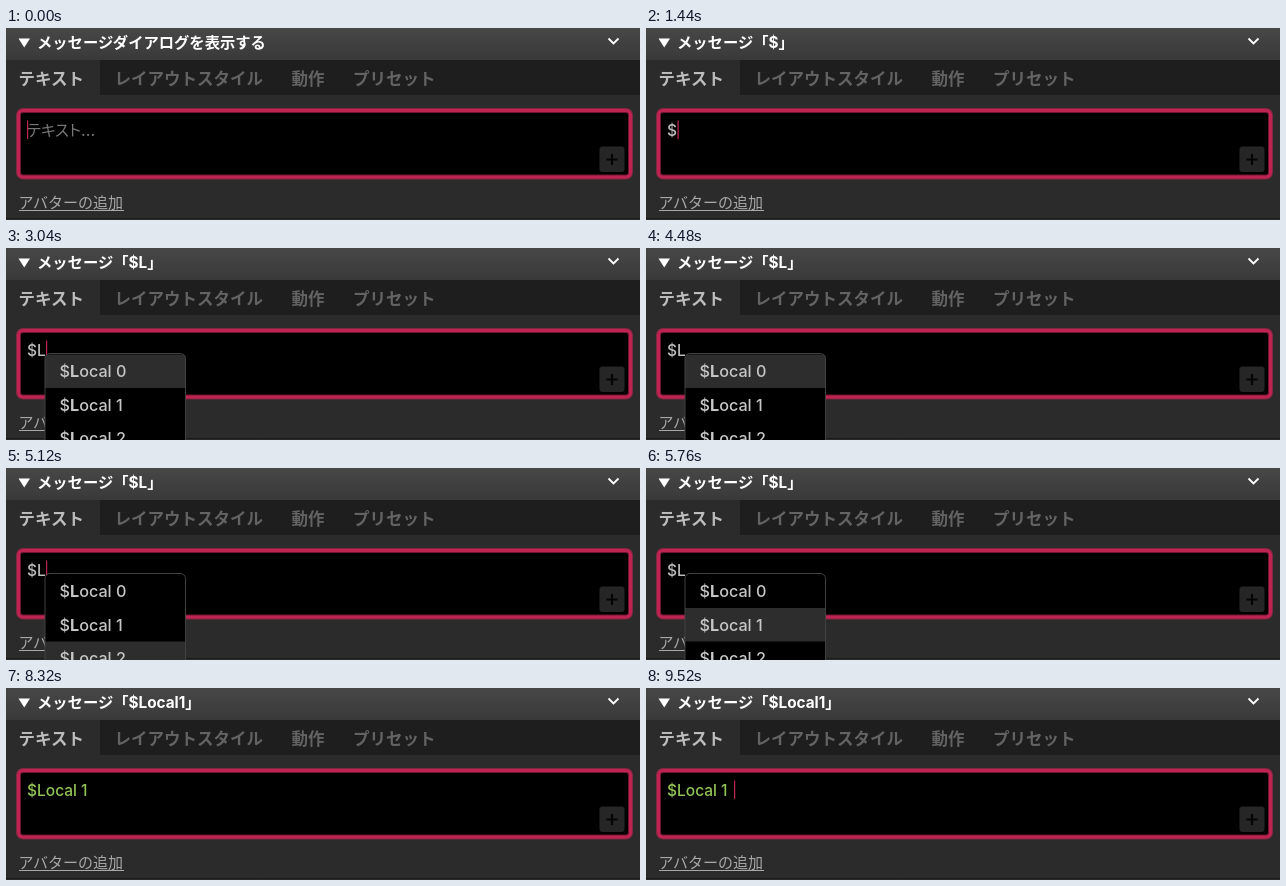
An HTML page for the animation above (9.6 s loop, 634 by 192 pixels).

```html
<!DOCTYPE html>
<html lang="ja">
<head>
<meta charset="utf-8">
<style>
html, body { margin: 0; width: 100%; height: 100%; overflow: hidden; background: #2b2b2b; }
svg { display: block; width: 634px; height: 192px; }
text { font-family: Inter, "Noto Sans CJK JP", "Noto Sans CJK", sans-serif; font-weight: 500; white-space: pre; }
.title { font-size: 15.3px; font-weight: 700; fill: #fff; }
.tab { font-size: 16.5px; font-weight: 700; fill: #636363; }
.tab.active { fill: #bdbdbd; }
.input { font-size: 15.5px; }
.hint { font-size: 15.5px; fill: #777; font-feature-settings: "palt"; }
.link { font-size: 15px; fill: #a8a8a8; }
.item { font-size: 16.2px; fill: #c6c6c6; }
.match { font-weight: 700; }
</style>
</head>
<body>
<svg viewBox="0 0 634 192">
  <defs>
    <linearGradient id="bar" x2="0" y2="1">
      <stop stop-color="#474747"/><stop offset="1" stop-color="#393939"/>
    </linearGradient>
    <clipPath id="menuClip"><rect x="39" y="105.5" width="140.5" height="110" rx="5"/></clipPath>
  </defs>

  <rect width="634" height="192" fill="#2b2b2b"/>
  <rect width="634" height="32" fill="url(#bar)"/>
  <path d="M12.5 10.5h11.5l-5.75 9z" fill="#fff"/>
  <text id="title" class="title" x="31" y="20"></text>
  <path d="M602.5 10.5l5 5 5-5" fill="none" stroke="#fff" stroke-width="1.8"/>

  <rect x="94" y="32" width="540" height="35" fill="#1e1e1e"/>
  <text class="tab active" x="12.5" y="57">テキスト</text>
  <text class="tab" x="108.5" y="57">レイアウトスタイル</text>
  <text class="tab" x="285.5" y="57">動作</text>
  <text class="tab" x="347" y="57">プリセット</text>

  <g stroke="#bd2452">
    <rect x="12.5" y="82.5" width="612" height="66.5" rx="4.5" fill="#000" stroke-width="5" stroke-opacity=".6"/>
    <rect x="12.5" y="82.5" width="612" height="66.5" rx="4.5" fill="none" stroke-width="3"/>
  </g>
  <text id="hint" class="hint" x="21" y="108">テキスト...</text>
  <text id="input" class="input" x="21" y="107.5"></text>
  <rect x="593.5" y="118.5" width="25" height="25.5" rx="3" fill="#262626"/>
  <path d="M600.5 131.5h11M606 126v11" stroke="#050505" stroke-width="2.2"/>

  <text class="link" x="12.5" y="179.5">アバターの追加</text>
  <path d="M13 182.5h105" stroke="#a8a8a8"/>
  <path d="M0 190.5h634" stroke="#1c1c1c"/>
  <rect id="caret" y="92.5" width="1.2" height="18.5" fill="#c02653"/>

  <g id="menu">
    <g clip-path="url(#menuClip)">
      <rect x="39" y="105" width="141" height="87" fill="#000"/>
      <rect id="pick" x="39" width="141" height="33.5" fill="#2d2d2d"/>
      <g id="items"></g>
    </g>
    <rect x="39" y="105.5" width="140.5" height="110" rx="5" fill="none" stroke="#414141"/>
  </g>
</svg>

<script>
const LOOP = 9600;
const ROW = 33.5;
const $ = id => document.getElementById(id);

// Each state: start time, title, input text, caret x
const states = [
  [0, 'メッセージダイアログを表示する', '', 21],
  [960, 'メッセージ「$」', '$', 31.5],
  [2960, 'メッセージ「$L」', '$L', 40],
  [6480, 'メッセージ「$Local1」', '$Local 1', 88]
];
// Each highlight: start time, menu row (-1 hides the menu)
const picks = [[0, -1], [2960, 0], [4800, 1], [5040, 2], [5520, 1], [6480, -1]];
// The caret toggles at each time, starting visible
const blinks = [480, 960, 1500, 2000, 2400, 2880, 3520, 3960, 4400, 4880,
  5400, 5920, 6400, 6480, 7000, 7500, 8000, 8500, 9000, 9500];

$('items').innerHTML = [0, 1, 2].map(i =>
  `<text class="item" x="53.5" y="${129 + i * ROW}">$<tspan class="match">L</tspan>ocal ${i}</text>`).join('');

const current = (list, t) => list.findLast(entry => entry[0] <= t);
const show = (id, on) => $(id).setAttribute('visibility', on ? 'visible' : 'hidden');

function draw(now) {
  const t = now % LOOP;
  const [, title, input, caretX] = current(states, t);
  const [, row] = current(picks, t);

  $('title').textContent = title;
  $('input').textContent = input;
  $('input').setAttribute('fill', input.length > 2 ? '#92c455' : '#bcbcbc');
  show('hint', !input);

  show('menu', row >= 0);
  $('pick').setAttribute('y', 106.5 + row * ROW);

  $('caret').setAttribute('x', caretX);
  show('caret', blinks.filter(time => time <= t).length % 2 === 0);
  requestAnimationFrame(draw);
}
draw(performance.now());
</script>
</body>
</html>
```
